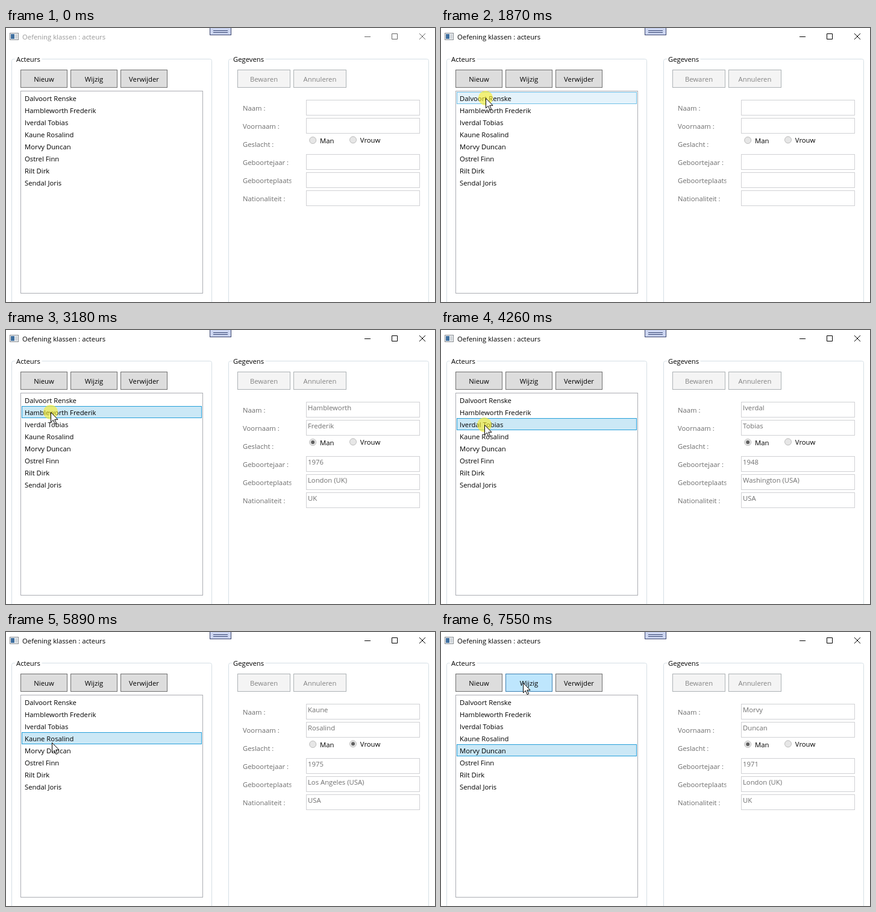
Animation of 712x454 px, one loop 8000 ms. Source, as an HTML page:

```html
<!DOCTYPE html>
<html lang="nl">
<head>
<meta charset="utf-8">
<title>Oefening klassen</title>
<style>
  html, body { margin: 0; width: 100%; height: 100%; overflow: hidden; background: #fff; }
  svg { display: block; width: 712px; height: 454px; }
  text { font: 11.3px "Open Sans", "Noto Sans", sans-serif; white-space: pre; }
</style>
</head>
<body>
<svg id="stage" viewBox="0 0 712 454">
  <clipPath id="labelClip"><rect x="385" y="110" width="88.5" height="190"/></clipPath>
</svg>
<script>
const LOOP = 8000;
const stage = document.getElementById('stage');

const people = [
  ['Dalvoort', 'Renske', 'V', '1973', 'Torhout (BE)', 'BE'],
  ['Hambleworth', 'Frederik', 'M', '1976', 'London (UK)', 'UK'],
  ['Iverdal', 'Tobias', 'M', '1948', 'Washington (USA)', 'USA'],
  ['Kaune', 'Rosalind', 'V', '1975', 'Los Angeles (USA)', 'USA'],
  ['Morvy', 'Duncan', 'M', '1971', 'London (UK)', 'UK'],
  ['Ostrel', 'Finn'],
  ['Rilt', 'Dirk'],
  ['Sendal', 'Joris'],
];

// When each person gets selected, and when the click halo shows.
const selections = [1930, 3180, 4260, 5190, 6350];
const halos = [[1870, 2010], [3180, 3340], [4260, 4410], [5190, 5350], [6350, 6520]];
const ACTIVATED = 1870;

// Pointer moves: start, end, number of positions, first point, last point.
const moves = [
  [910, 1380, 7, [436, 386], [74, 116]],
  [2420, 2630, 4, [74, 119], [74, 136]],
  [3570, 3950, 6, [74, 139], [72, 157]],
  [4730, 4870, 3, [72, 165], [73, 181]],
  [5350, 5510, 3, [73, 180], [73, 179]],
  [5890, 6120, 4, [76, 183], [77, 196]],
  [6900, 7550, 9, [86, 186], [136, 84]],
];

function add(tag, attrs, content = '') {
  const el = document.createElementNS('http://www.w3.org/2000/svg', tag);
  set(el, attrs);
  el.textContent = content;
  return stage.appendChild(el);
}
function set(el, attrs) {
  for (const name in attrs) el.setAttribute(name, attrs[name]);
}
const show = (el, visible) => set(el, { visibility: visible ? 'visible' : 'hidden' });
const text = (x, y, content, fill = '#000', more = {}) => add('text', { x, y, fill, ...more }, content);
const box = (x, y, w, h, fill, stroke) =>
  add('rect', { x: x + .5, y: y + .5, width: w - 1, height: h - 1, fill, stroke });
const line = (d, stroke) => add('path', { d, stroke, fill: 'none' });

function button(x, w, label, enabled) {
  const face = box(x, 69, w, 30, enabled ? '#ddd' : '#f4f4f4', enabled ? '#707070' : '#adb2b5');
  text(x + w / 2, 89, label, enabled ? '#000' : '#838383', { 'text-anchor': 'middle' });
  return { x, w, face };
}
function group(x, label, gapEnd) {
  line(`M${x + 5} 51.5h-2a3 3 0 0 0-3 3V460M${gapEnd} 51.5H${x + 329}a3 3 0 0 1 3 3V460`, '#d5dfe5');
  text(x + 7.5, 56, label);
}
function radio(x, y, label, labelY) {
  add('circle', { cx: x, cy: y, r: 5.5, fill: '#e6e6e6', stroke: '#bcbcbc' });
  const dot = add('circle', { cx: x, cy: y, r: 3, fill: '#606060' });
  text(x + 11.8, labelY, label);
  return dot;
}

// Title bar
box(6, 8, 15, 12, '#f4f6f8', '#85898e');
add('rect', { x: 8, y: 10, width: 6, height: 8, fill: '#3f6f9f' });
add('rect', { x: 15, y: 10, width: 4, height: 8, fill: '#d0d5da' });
const title = text(27, 19, 'Oefening klassen : acteurs');
const windowIcons = line('M595 14.5h10M640.5 9.5h9v9h-9zM686 9l10 10M696 9l-10 10');
box(338, -2, 36, 14, '#ccd5f0', '#3b4670');
line('M344 4.5h24M344 7.5h24', '#34426f');

// List of actors
group(9.5, 'Acteurs', 59.5);
const buttons = [button(24, 78, 'Nieuw', true), button(107, 78, 'Wijzig', true), button(190, 78, 'Verwijder', true)];
box(24, 104, 303, 336, '#fff', '#abadb3');
const rows = people.map(([last, first], i) => {
  const row = box(26, 106 + 20 * i, 299, 20, 'none', 'none');
  text(31, 121 + 20 * i, `${last} ${first}`);
  return row;
});

// Details
group(369.5, 'Gegevens', 430.5);
button(384, 88, 'Bewaren', false);
button(477, 88, 'Annuleren', false);
const labels = ['Naam :', 'Voornaam :', 'Geslacht :', 'Geboortejaar :', 'Geboorteplaats :', 'Nationaliteit :'];
const fields = labels.map((label, i) => {
  const y = 119 + 30 * i;
  text(393, y + 18, label, '#6d6d6d', { 'clip-path': 'url(#labelClip)' });
  if (i === 2) return null;
  box(498, y, 189, 26, '#fff', '#d0d1d4');
  return text(501, y + 14, '', '#707070');
});
const man = radio(509.2, 186, 'Man', 191);
const woman = radio(576, 185.3, 'Vrouw', 190);

// Pointer
const halo = add('circle', { r: 12, fill: '#faee28', opacity: .62 });
const arrow = add('path', { d: 'M.5.5v16.3l3.8-3.6 2.8 6.4 2.5-1.1-2.8-6.2h5.2z', fill: '#fff', stroke: '#000' });

function pointerAt(t) {
  const move = moves.filter(m => m[0] <= t).pop();
  if (!move) return null;
  const [start, end, count, from, to] = move;
  const step = Math.floor((t - start) / (end - start) * (count - 1) + 1e-6);
  const p = Math.min(1, step / (count - 1));
  const eased = p * (2 - p);
  return from.map((v, i) => Math.round(v + (to[i] - v) * eased));
}

function draw(t) {
  const pointer = pointerAt(t);
  const [x, y] = pointer || [-99, -99];
  const active = t >= ACTIVATED;
  const selected = selections.filter(s => s <= t).length - 1;
  const person = people[selected] || [];

  set(title, { fill: active ? '#000' : '#999' });
  set(windowIcons, { stroke: active ? '#000' : '#666' });

  const hovered = x >= 26 && x < 325 ? Math.floor((y - 106) / 20) : -1;
  rows.forEach((row, i) => {
    const [fill, stroke] = i === selected ? ['#cbe8f6', '#26a0da']
      : i === hovered ? ['#e5f3fb', '#70c0e7'] : ['none', 'none'];
    set(row, { fill, stroke });
  });
  for (const b of buttons) {
    const over = x >= b.x && x < b.x + b.w && y >= 69 && y < 99;
    set(b.face, { fill: over ? '#bee6fd' : '#ddd', stroke: over ? '#3c7fb1' : '#707070' });
  }

  fields.forEach((field, i) => { if (field) field.textContent = person[i] || ''; });
  show(man, person[2] === 'M');
  show(woman, person[2] === 'V');

  show(arrow, pointer);
  set(arrow, { transform: `translate(${x} ${y})` });
  show(halo, halos.some(([on, off]) => t >= on && t < off));
  set(halo, { cx: x, cy: y });
}

const began = performance.now();
function frame() {
  draw((performance.now() - began) % LOOP);
  requestAnimationFrame(frame);
}
frame();
</script>
</body>
</html>
```
